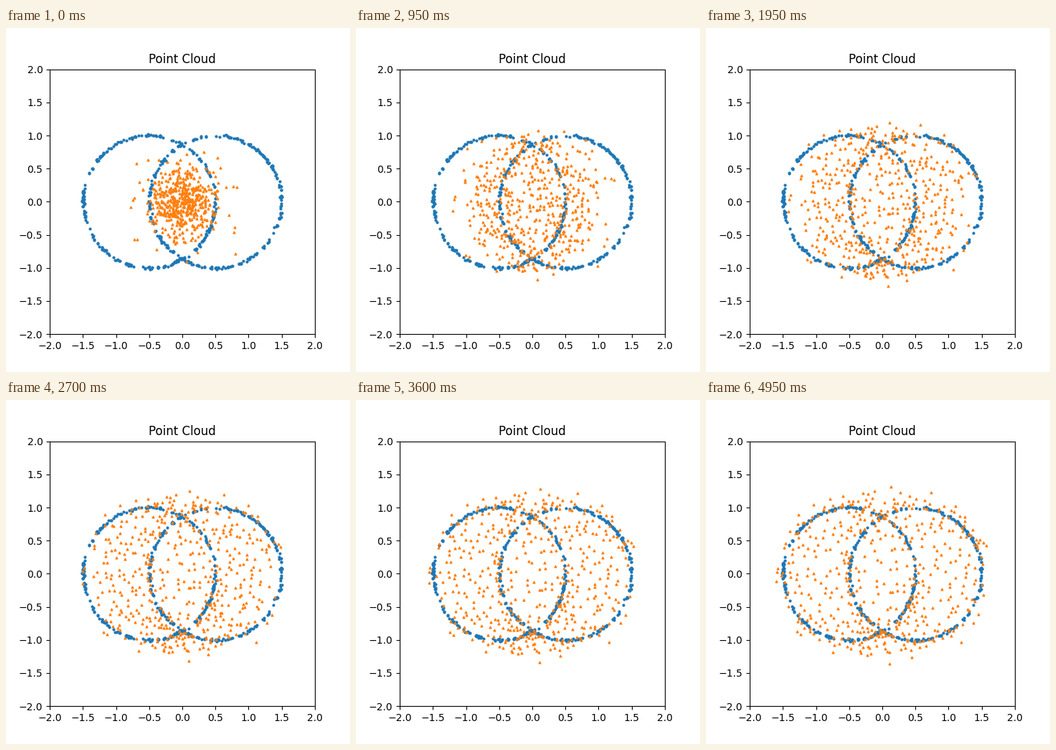
A matplotlib script that plays this animation: 480x480 px, repeating every 5 s.

```python
import numpy as np
import matplotlib.pyplot as plt
from matplotlib.animation import FuncAnimation

FRAMES = 100
INTERVAL = 50
COUNT = 500

rng = np.random.default_rng(4)


def ring(cx, n):
    """Random points on a slightly rough unit circle."""
    angle = rng.uniform(0, 2 * np.pi, n)
    radius = 1 + rng.normal(0, 0.01, n)
    return np.column_stack([cx + radius * np.cos(angle), radius * np.sin(angle)])


def start_cloud():
    """Gaussian blob with a few known stragglers."""
    far = np.array([
        (0.80, -0.79), (0.82, 0.22), (0.77, 0.23), (0.79, -0.38),
        (0.78, -0.46), (-0.78, -0.08), (-0.72, -0.57), (-0.68, -0.57),
        (-0.75, 0.03), (-0.69, 0.58), (0.53, 0.66), (0.32, 0.75),
        (0.06, -0.90), (-0.39, -0.72), (0.57, 0.51), (0.70, -0.20),
        (-0.73, 0.06), (-0.65, 0.30), (-0.52, 0.63), (-0.36, 0.63),
        (0.07, 0.72), (0.23, -0.76), (0.66, 0.22),
    ])
    blob = rng.normal((-0.02, 0), 0.27, (2 * COUNT, 2))
    blob = blob[np.hypot(*blob.T) < 0.65]
    return np.vstack([far, blob[:COUNT - len(far)]])


def mean_direction(points, others):
    """Average unit vector from the others to each point."""
    diff = points[:, None] - others[None]
    dist = np.sqrt((diff ** 2).sum(axis=2)) + 1e-3
    return (diff / dist[..., None]).mean(axis=1)


def flow(cloud, goal):
    """Gradient flow of the energy distance, one cloud per frame."""
    path = [cloud]
    for step in range(FRAMES - 1):
        rate = 0.05 + 0.03 * np.exp(-step / 15)
        push = mean_direction(cloud, cloud) - mean_direction(cloud, goal)
        cloud = cloud + rate * push
        path.append(cloud)
    return path


goal = np.vstack([ring(-0.5, COUNT // 2), ring(0.5, COUNT // 2)])
path = flow(start_cloud(), goal)

fig, ax = plt.subplots(figsize=(4.8, 4.8), dpi=100)
ax.set_aspect("equal")
ax.set_xlim(-2, 2)
ax.set_ylim(-2, 2)
ticks = np.arange(-2, 2.1, 0.5)
ax.set_xticks(ticks)
ax.set_yticks(ticks)
ax.set_title("Point Cloud")
ax.scatter(*goal.T, s=4, color="C0")
moving = ax.scatter(*path[0].T, s=4, color="C1", marker="^")


def update(i):
    moving.set_offsets(path[i])
    return (moving,)


anim = FuncAnimation(fig, update, frames=FRAMES, interval=INTERVAL, repeat=True)
plt.show()
```
